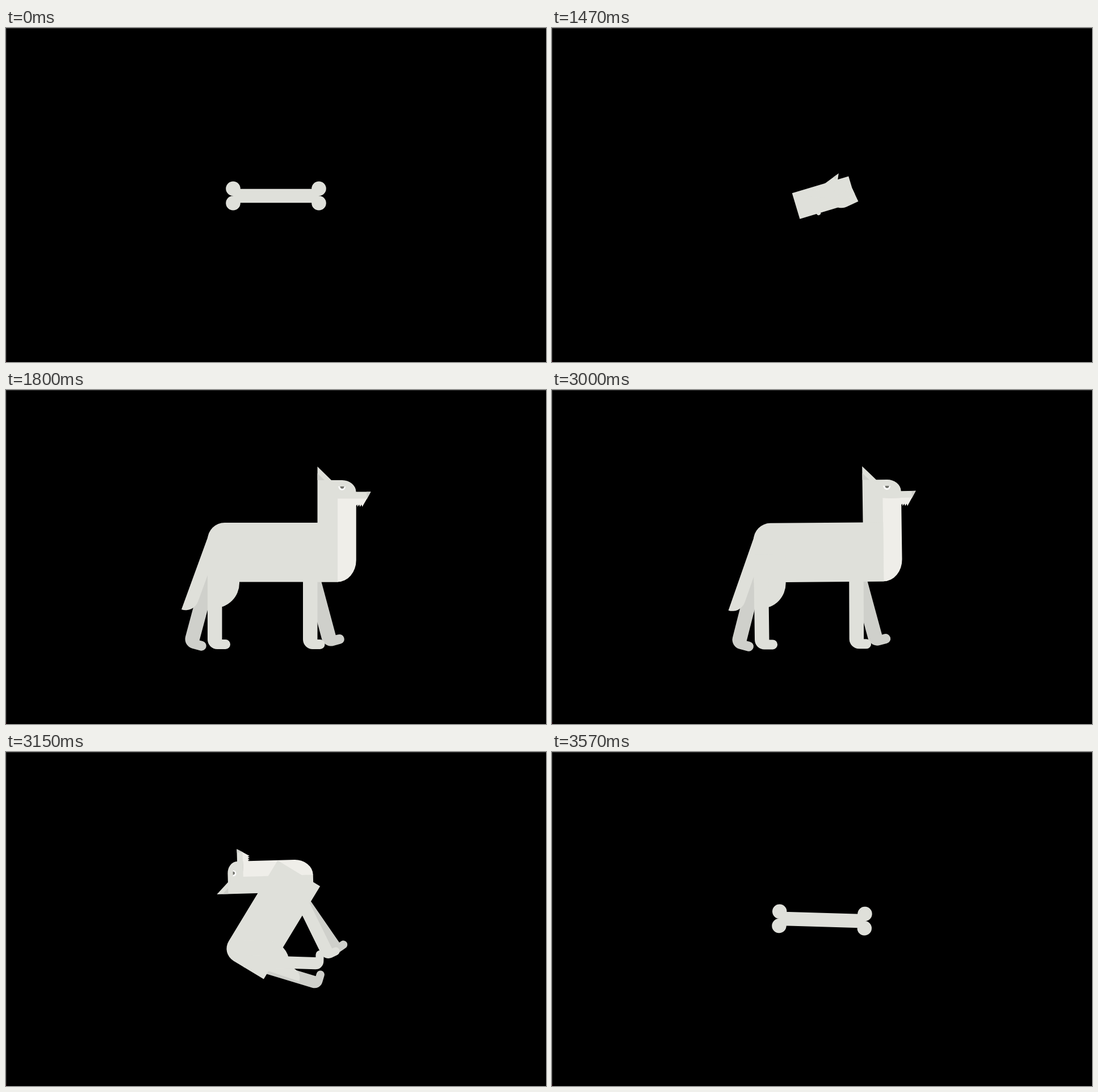
An HTML page with a canvas for the animation above (3600 ms loop, 951 px wide and 589 px high).

```html
<!DOCTYPE html>
<html lang="en">
<head>
<meta charset="utf-8">
<title>Bone and wolf</title>
<style>
  html, body { margin: 0; width: 100%; height: 100%; overflow: hidden; background: #000; }
  canvas { display: block; }
</style>
</head>
<body>
<canvas id="stage" width="951" height="589"></canvas>
<script>
const ctx = document.getElementById('stage').getContext('2d');
const LOOP = 3600, STEP = 30, STEPS = 21, OPEN_AT = 1200, CLOSE_AT = 3000;
const CENTER = [475.5, 295.7];
const FUR = '#dfe0da', SHADE = '#cfd0cb', LIGHT = '#efeee9';

const legPath = (left, height, foot) => new Path2D(
  `M${left} 0V${height - 17}a17 17 0 0 0 17 17H${left + foot - 8.5}
   a8.5 8.5 0 0 0 0-17H${left + 25.5}V0Z`);

const frontLeg = legPath(-14, 132, 38.5);
const farFrontLeg = legPath(-13, 131.5, 38.5);
const rearLeg = legPath(0, 167.5, 40);
const thigh = new Path2D('M0 0H56V51a44 44 0 0 1-44 44H0Z');
const tail = new Path2D('M-22.6 0H0V122a22.6 23.5 0 0 1-22.6 23.5Z');
const body = new Path2D('M355 264a30 30 0 0 1 30-30H584V338.5H355Z');

const head = [
  [FUR, 'M548.5 135L573 159H592A24.5 21 0 0 1 616.5 179.5H642.5L635.8 192H585V338.5H548.5Z'],
  [SHADE, 'M548.5 147L561 159H548.5Z'],
  [SHADE, 'M635 179.5H642.5L636 191Z'],
  [LIGHT, `M584 191.5H635.8L630 201.5L627.5 206L626 202L623.5 206L622 202L619 206
           L618.5 202L616.7 204V300A32.7 38.5 0 0 1 584 338.5Z`],
  ['#fff', 'M585.3 169.5L588 170.5H598A6.4 7 0 0 1 585.3 171Z'],
  ['#74756f', 'M588.5 170H595.5A3.5 4 0 0 1 588.5 170Z']
].map(([color, d]) => [color, new Path2D(d)]);

const bone = new Path2D('M-75.5-12.3H75.5V12.3H-75.5Z');
for (const x of [-75.5, 75.5])
  for (const y of [-12.7, 12.7]) {
    bone.moveTo(x + 12.8, y);
    bone.arc(x, y, 12.8, 0, Math.PI * 2);
  }

function fill(path, color = FUR) {
  ctx.fillStyle = color;
  ctx.fill(path);
}

function posed(x, y, degrees, scale, draw) {
  ctx.save();
  ctx.translate(x, y);
  ctx.rotate(degrees * Math.PI / 180);
  ctx.scale(scale, scale);
  draw();
  ctx.restore();
}

const easeInOut = t => t < .5 ? 2 * t * t : 1 - 2 * (1 - t) ** 2;

// 0 is the bone, 1 the standing wolf.
function wolfness(time) {
  const progress = start => Math.min(1, (Math.floor((time - start) / STEP) + 1) / STEPS);
  if (time < OPEN_AT) return 0;
  if (time < CLOSE_AT) return easeInOut(progress(OPEN_AT));
  // The closing move sets off half a step late.
  return 1 - easeInOut(time < CLOSE_AT + STEP ? .55 / STEPS : progress(CLOSE_AT));
}

function drawWolf(fold) {
  const part = (x, y, degrees, draw) => posed(x, y, degrees, 1, draw);
  ctx.translate(-CENTER[0], -CENTER[1]);
  part(355, 289.5, 15 - 180 * fold, () => fill(rearLeg, SHADE));
  part(539, 325, -15 + 240 * fold, () => fill(farFrontLeg, SHADE));
  part(380, 258, 20 - 200 * fold, () => fill(tail));
  part(547.7, 304, -201 * fold, () => {
    ctx.translate(-547.7, -304);
    for (const [color, path] of head) fill(path, color);
  });
  fill(body);
  part(355, 289.5, -180 * fold, () => { fill(thigh); fill(rearLeg); });
  part(537, 325, 200 * fold, () => fill(frontLeg));
}

function drawBackdrop() {
  const rect = (color, ...box) => { ctx.fillStyle = color; ctx.fillRect(...box); };
  rect('#000', 0, 0, 951, 589);
  rect('#262626', 0, 0, 1, 589);
  rect('#333', 0, 0, 951, 1);
  rect('#3a0a16', 0, 586, 1, 3);
}

function render(now) {
  const p = wolfness(now % LOOP);
  drawBackdrop();
  if (p < 1) posed(475.5, 296, 360 * p, 1 - p, () => fill(bone));
  if (p > 0) posed(...CENTER, 360 * p, p, () => drawWolf(1 - p));
}

const start = performance.now();
function tick() {
  render(performance.now() - start);
  requestAnimationFrame(tick);
}
tick();
</script>
</body>
</html>
```
